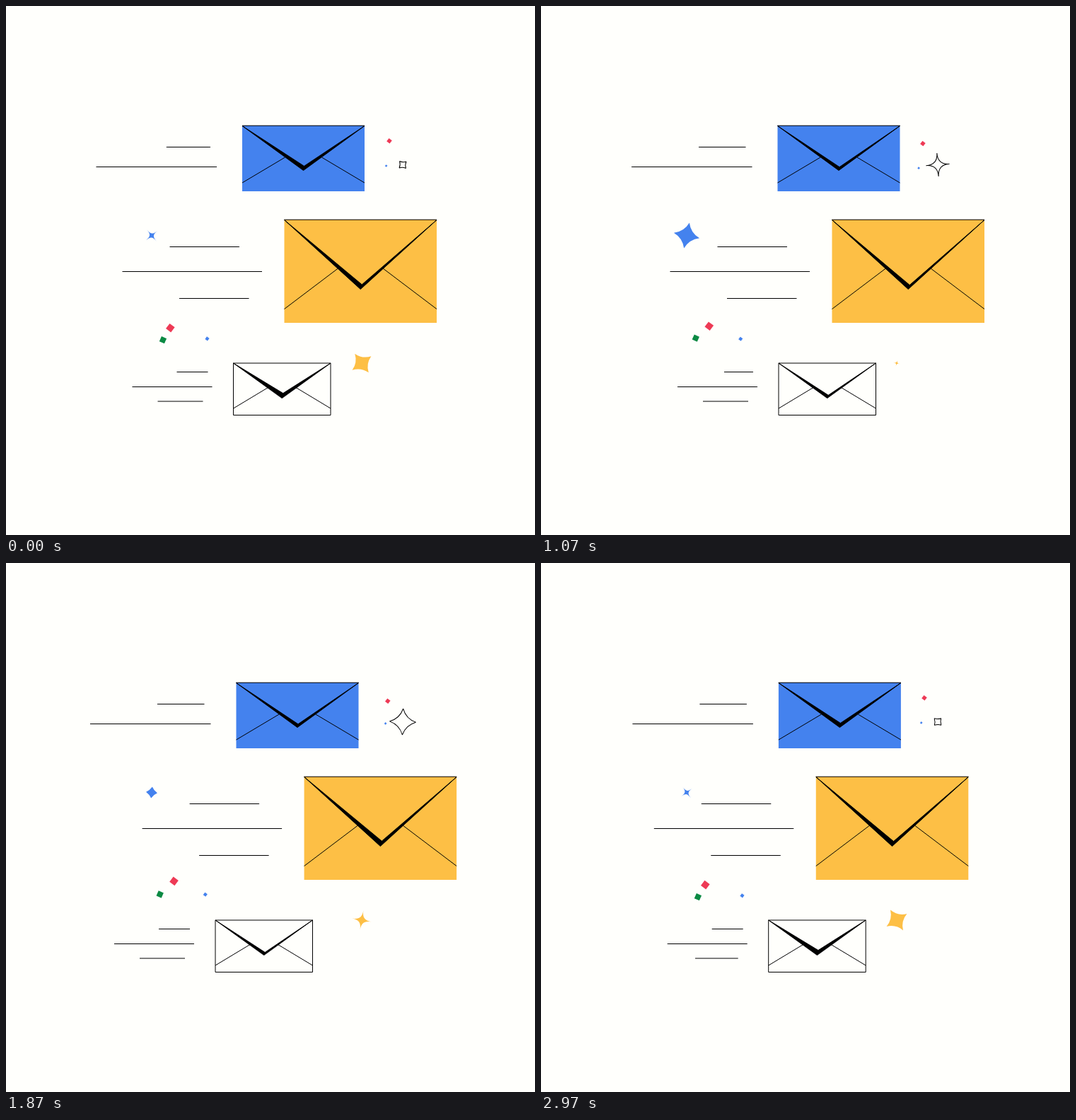
An HTML page with a canvas for the animation above (3010 ms loop, 748x748 px).

```html
<!DOCTYPE html>
<html lang="en">
<head>
<meta charset="utf-8">
<title>Flying envelopes</title>
<style>
  html, body { margin: 0; width: 100%; height: 100%; overflow: hidden; background: #fffffc; }
  canvas { display: block; width: 748px; height: 748px; }
</style>
</head>
<body>
<canvas id="stage"></canvas>
<script>
const SIZE = 748, LOOP = 3010, STEPS = 90, TAU = Math.PI * 2;
const PAGE = '#fffffc', BLUE = '#4482ee', YELLOW = '#fdbf45', RED = '#ee3a55', GREEN = '#0b8a43', INK = '#000';
const canvas = document.getElementById('stage');
const ctx = canvas.getContext('2d');
const dpr = window.devicePixelRatio || 1;
canvas.width = canvas.height = SIZE * dpr;
ctx.scale(dpr, dpr);

// Looping cosine; peak is a fraction of the loop
const wave = (mean, amp, peak, freq = 1) => t => mean + amp * Math.cos(TAU * freq * (t / LOOP - peak));

// Smooth looping curve through a few [time, value] points
function path(...points) {
  const n = points.length;
  const at = i => {
    const turn = Math.floor(i / n), [time, value] = points[i - turn * n];
    return [time + turn * LOOP, value];
  };
  const slope = i => {
    const [t0, v0] = at(i - 1), [t1, v1] = at(i), [t2, v2] = at(i + 1);
    const a = (v1 - v0) / (t1 - t0), b = (v2 - v1) / (t2 - t1);
    return a * b <= 0 ? 0 : 2 * a * b / (a + b);
  };
  return t => {
    let i = n - 1;
    while (i >= 0 && points[i][0] > t) i--;
    const [t1, v1] = at(i), [t2, v2] = at(i + 1);
    const d = t2 - t1, u = (t - t1) / d, w = 1 - u;
    return v1 * w * w * (1 + 2 * u) + v2 * u * u * (3 - 2 * u)
      + d * u * w * (slope(i) * w - slope(i + 1) * u);
  };
}

// Speed line behind an envelope; it shortens briefly once per loop
const trail = (gap, y, len, dipAt, dip) => ({ gap, y, len, dipAt, dip });

const envelopes = [
  {
    x: path([0, 334], [370, 314], [550, 311], [1070, 334.5], [1570, 333],
      [1930, 325], [2330, 335], [2970, 336]),
    y: 169, w: 173, h: 93, fill: BLUE, apex: 64, seam: [81, 60.5, 45],
    lean: 1, fold: wave(5.8, 0.8, 0),
    trails: [trail(45, 199.5, 66.5, 80, 13), trail(36, 227.5, 170.5, 2330, 26)]
  },
  {
    x: path([0, 393.5], [370, 412], [700, 428], [1070, 411.5], [1320, 425], [1570, 412.5],
      [1870, 421.5], [2150, 436], [2330, 423.5], [2690, 398], [2970, 388.5]),
    y: 302, w: 215.5, h: 146, fill: YELLOW, apex: 99, seam: [126.5, 76, 69],
    lean: 2, fold: wave(5.8, 2, 0.955, 3),
    trails: [trail(63.5, 340.5, 98.5, 370, 14.5), trail(31.5, 375.5, 197.5, 370, 31),
      trail(50, 413.5, 98.5, 1570, 2.5)]
  },
  {
    x: path([370, 314.5], [1070, 336], [1570, 310], [1870, 296], [2330, 315], [2970, 321.7]),
    y: 504.5, w: 137.5, h: 74, fill: null, apex: 50.5, seam: [64.5, 49, 35],
    lean: 1.5, fold: wave(5.7, 1.7, 0),
    trails: [trail(36, 517.5, 44, 1070, 3), trail(30, 538.5, 113, 1570, 20),
      trail(43, 559, 64, 2890, 12)]
  }
];

const stars = [
  { x: 206, y: 324.5, fill: BLUE, start: 50, spin: -1,
    outer: wave(12, 7.3, 0.28), inner: wave(5.5, 4.4, 0.35) },
  { x: 503, y: 505, fill: YELLOW, start: 54, spin: -1,
    outer: wave(12.4, 7.7, 0.84), inner: wave(5.4, 4.2, 0.9) },
  { x: 561, y: 224.5, fill: null, start: 48, spin: 1,
    outer: wave(13.2, 6.6, 0.52), inner: wave(6.2, 3.5, 0.63) }
];

const chips = [
  { fill: RED, side: 5.4, turn: 38, x: wave(540.7, 1.3, 0), y: wave(193.2, 2.5, 0.52) },
  { fill: BLUE, side: 2.6, turn: 38, x: wave(536.3, 2.2, 0.85), y: wave(227.2, 2, 0.35) },
  { fill: RED, side: 9, turn: 37, x: wave(235.5, 3.2, 0.48), y: wave(452.8, 3, 0.1) },
  { fill: GREEN, side: 7.8, turn: 24, x: wave(219.7, 2.3, 0.04), y: wave(470.3, 2, 0.05) },
  { fill: BLUE, side: 4.4, turn: 36, x: wave(283, 1.5, 0.02), y: wave(470, 1.4, 0.2) }
];

function line(x1, y1, x2, y2) {
  ctx.beginPath();
  ctx.moveTo(x1, y1);
  ctx.lineTo(x2, y2);
  ctx.stroke();
}

function drawTrail(tr, x, t) {
  const len = tr.len - tr.dip * Math.max(0, 1 - Math.abs(t - tr.dipAt) / 120);
  line(x - tr.gap - len, tr.y, x - tr.gap, tr.y);
}

function drawEnvelope(e, t) {
  const x = e.x(t), { y, w, h } = e, mid = x + w / 2, tip = y + e.apex;
  const [low, inset, high] = e.seam;
  e.trails.forEach(tr => drawTrail(tr, x, t));
  if (e.fill) {
    ctx.fillStyle = e.fill;
    ctx.fillRect(x, y, w, h);
    line(x, y + 0.2, x + w, y + 0.2);
  } else {
    ctx.strokeRect(x, y + 0.5, w, h - 0.5);
  }
  line(x, y + low, x + inset, y + high);
  line(x + w, y + low, x + w - inset, y + high);
  ctx.beginPath();
  ctx.moveTo(x, y + 0.5);
  ctx.lineTo(mid, tip - 0.5);
  ctx.lineTo(x + w, y + 0.5);
  ctx.lineTo(mid + e.lean, tip - e.fold(t));
  ctx.closePath();
  ctx.fillStyle = INK;
  ctx.fill();
  ctx.stroke();
}

// Four tips at the outer radius, sides bowed in to the inner radius
function drawStar(s, t) {
  const R = s.outer(t), r = s.inner(t), pull = r * Math.SQRT2 - R / 2;
  const k = Math.max(0, (8 * r / Math.SQRT2 - R) / 3);
  ctx.save();
  ctx.translate(s.x, s.y);
  ctx.rotate(s.start * TAU / 360 + s.spin * TAU * t / LOOP);
  ctx.beginPath();
  ctx.moveTo(R, 0);
  for (let i = 0; i < 4; i++) {
    const a = i * TAU / 4, c = Math.cos(a), d = Math.sin(a);
    if (pull >= 0) ctx.quadraticCurveTo(pull * (c - d), pull * (c + d), -R * d, R * c);
    else ctx.bezierCurveTo(k * c, k * d, -k * d, k * c, -R * d, R * c);
  }
  ctx.closePath();
  if (s.fill) {
    ctx.fillStyle = s.fill;
    ctx.fill();
  } else {
    ctx.stroke();
  }
  ctx.restore();
}

function drawChip(c, t) {
  ctx.save();
  ctx.translate(c.x(t), c.y(t));
  ctx.rotate(c.turn * TAU / 360);
  ctx.fillStyle = c.fill;
  ctx.fillRect(-c.side / 2, -c.side / 2, c.side, c.side);
  ctx.restore();
}

function draw(t) {
  ctx.fillStyle = PAGE;
  ctx.fillRect(0, 0, SIZE, SIZE);
  ctx.strokeStyle = INK;
  ctx.lineWidth = 1;
  ctx.lineJoin = 'bevel';
  envelopes.forEach(e => drawEnvelope(e, t));
  stars.forEach(s => drawStar(s, t));
  chips.forEach(c => drawChip(c, t));
}

const begin = performance.now();
function tick() {
  const step = LOOP / STEPS, t = (performance.now() - begin) % LOOP;
  draw(Math.min(STEPS - 1, Math.floor(t / step + 0.35)) * step);
  requestAnimationFrame(tick);
}
tick();
</script>
</body>
</html>
```
